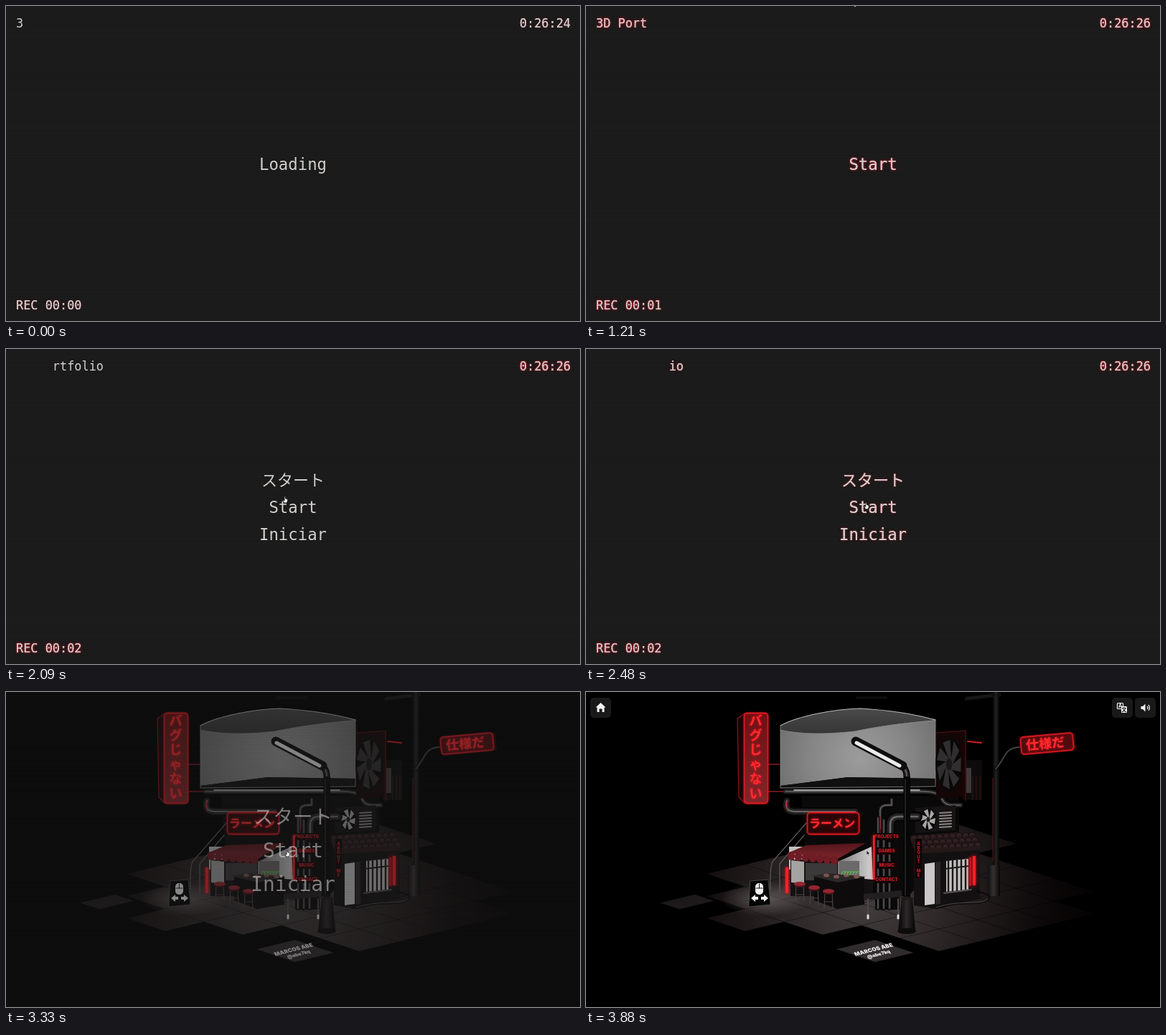
These frames come from a looping animation (800x440 px, 3910 ms). An HTML page with a canvas:

```html
<!DOCTYPE html>
<html lang="en">
<head>
<meta charset="utf-8">
<title>3D Portfolio</title>
<style>
html, body { margin: 0; width: 100%; height: 100%; overflow: hidden; background: #000; }
canvas { display: block; width: 800px; height: 440px; }
</style>
</head>
<body>
<canvas id="stage" width="800" height="440"></canvas>
<script>
const W = 800, H = 440, LOOP = 3910, CLICK = 2970, FADE = 660;
const MONO = '"DejaVu Sans Mono", monospace';
const CJK = '"Noto Sans CJK JP", "Noto Sans CJK", sans-serif';
const SANS = 'Inter, sans-serif';
const RED = '#f5202a';
const screen = document.getElementById('stage').getContext('2d');

const clamp = v => Math.max(0, Math.min(1, v));
const ramp = (t, from, span) => clamp((t - from) / span);
const ease = k => k * k * (3 - 2 * k);

function layer(draw) {
  const c = document.createElement('canvas');
  c.width = W; c.height = H;
  draw(c.getContext('2d'));
  return c;
}

function stops(g, colors) {
  colors.forEach((k, i) => g.addColorStop(i / (colors.length - 1), k));
  return g;
}

const scene = layer(c => {
  const repeat = (n, draw) => { for (let i = 0; i < n; i++) draw(i); };
  const across = (x, w, ...k) => stops(c.createLinearGradient(x, 0, x + w, 0), k);
  const down = (y, h, ...k) => stops(c.createLinearGradient(0, y, 0, y + h), k);
  const radial = (x, y, r, ...k) => stops(c.createRadialGradient(x, y, 0, x, y, r), k);
  const shape = (fill, d) => { c.fillStyle = fill; c.fill(new Path2D(d)); };
  const line = (color, w, d) => { c.strokeStyle = color; c.lineWidth = w; c.stroke(new Path2D(d)); };
  const rect = (fill, x, y, w, h) => { c.fillStyle = fill; c.fillRect(x, y, w, h); };
  // upright panel whose top and bottom edges slope by dy
  const wall = (fill, x, y, w, h, dy) => shape(fill, `M${x} ${y}l${w} ${dy}v${h}l${-w} ${-dy}Z`);
  const oval = (fill, x, y, rx, ry) => {
    c.beginPath(); c.ellipse(x, y, rx, ry, 0, 0, 7); c.fillStyle = fill; c.fill();
  };
  const pipe = (w, d) => {
    line('#050505', w, d); line('#242222', w * .65, d); line('#6b6868', w * .18, d);
  };
  const glow = (n, draw) => {
    c.save(); c.shadowColor = '#ff1018'; c.shadowBlur = n; draw(); c.restore();
  };
  const label = (s, x, y, font, color = RED) => {
    c.font = font; c.fillStyle = color; c.fillText(s, x, y);
  };
  const sign = (x, y, w, h, fill) => glow(2, () => {
    c.beginPath(); c.roundRect(x, y, w, h, 4);
    c.fillStyle = fill; c.fill();
    c.strokeStyle = '#d81c25'; c.lineWidth = 1.3; c.stroke();
  });
  const kana = (s, x, y, size) => glow(3, () => label(s, x, y, `900 ${size}px ${CJK}`, '#ff2b30'));
  const fan = (x, y, rx, ry, n, color) => {
    oval('#080808', x, y, rx, ry);
    c.save(); c.translate(x, y); c.scale(rx, ry);
    repeat(n, () => {
      c.rotate(2 * Math.PI / n);
      shape(color, 'M.12-.1L.35-.85 .75-.5 .2 .05Z');
    });
    c.restore();
    oval('#181818', x, y, rx * .22, ry * .22);
  };
  // paving grid: i runs right and away, j runs left and away
  const spot = (i, j) => `${492 + 54 * (i - j)} ${362 - 13 * i - 18 * j}`;
  const slab = (fill, i, j, a = 1, b = 1) => {
    const d = `M${spot(i, j)}L${spot(i + a, j)} ${spot(i + a, j + b)} ${spot(i, j + b)}Z`;
    shape(fill, d); line('rgba(0,0,0,.3)', .6, d);
  };

  c.lineCap = c.lineJoin = 'round';
  c.textAlign = 'center'; c.textBaseline = 'middle';
  rect('#000', 0, 0, W, H);

  // paving
  const floor = radial(390, 292, 320, '#423c3d', '#332d2e', '#211b1c', '#0e090a', '#030202');
  [0, 0, -1, -2, -1, 0].forEach((first, j) => {
    for (let i = first; i < 4 + j / 3; i++) slab(floor, i, j);
  });
  const pool = radial(0, 0, 1, 'rgba(150,142,142,.5)', 'rgba(150,142,142,0)');
  c.save(); c.translate(250, 289); c.scale(62, 24); oval(pool, 0, 0, 1, 1); c.restore();
  slab('#1d191a', -2, 4.7, .9, .5);
  slab('#302b2c', -1.45, .2);
  ['MARCOS ABE', '@abe7kq'].forEach((s, i) => {
    c.save();
    c.transform(.96, -.25, .5, .85, 401 + i * 7, 360 + i * 6.5);
    label(s, 0, 0, `900 ${8 - i}px ${SANS}`, '#eee');
    c.restore();
  });

  // far pole and rooftop machinery
  rect('#0d0b0c', 376, 6, 44, 4);
  wall('#171515', 528, 7, 50, 5, -6);
  rect(across(567, 9, '#080808', '#242122', '#050505'), 567, 0, 9, 284);
  line('#581a1f', 1, 'M567 120V235');
  rect(across(559, 18, '#0b0b0b', '#353132', '#060606'), 560, 242, 17, 43);
  pipe(4, 'M604 77C586 78 585 88 578 98L571 108');
  rect('#0d0b0b', 525, 95, 27, 56);
  rect('#3c393a', 529, 106, 8, 35);
  repeat(3, i => line('#37191b', 1, `M${539 + i * 5} 118v32`));
  line('#d31e28', 2, 'M532 69l19 2');

  // building body
  shape('#0a0909', 'M300 145H520V200L450 285H400L305 215Z');
  pipe(9, 'M278 139H470Q492 139 496 149T512 158H522');
  pipe(12, 'M280 152Q276 166 290 167H375');
  line('#b82129', 1.5, 'M279 154l2 12');
  line('#cfcfcf', 1.3, 'M290 137H465');
  pipe(7, 'M410 190V166Q410 158 420 158H426V150');

  // billboard
  wall('#080808', 270, 46, 219, 90, -8);
  shape(radial(382, 92, 140, '#9c9c9c', '#858585', '#686868'), 'M271 48L384 25 487 38V121L365 119 271 131Z');
  shape(down(23, 35, '#4a4a4a', '#363636'), 'M271 47C298 32 350 24 382 23Q440 26 487 39Q420 45 374 55Q310 62 271 53Z');
  line('#b9b9b9', 1.1, 'M271 47C298 32 350 24 382 23Q440 26 487 39');
  line('#8d8d8d', .7, 'M271 53Q310 62 374 55Q420 45 487 40');
  shape('#101010', 'M271 131L365 119 487 121V133L271 134Z');
  line('#8e8e8e', .8, 'M271 48V134L487 132V39');

  // rooftop fans
  wall('#140606', 488, 57, 42, 92, -3);
  line('#5e1116', 1, 'M488 57l41-3v98');
  fan(506, 101, 19, 38, 7, '#312e2f');
  wall('#151313', 459, 162, 56, 35, -4);
  fan(477, 178, 11, 16, 6, '#a8a5a5');
  repeat(6, i => line('#8b8686', 2, `M493 ${169 + i * 4}l16-1`));

  // neon signs
  const side = 'M221 30L211 37 213 147 221 155Z';
  shape('#170506', side); line('#94131a', 1.2, side);
  line('#67151a', 2, 'M253 101h17M253 139h22');
  sign(220.5, 29.5, 33, 126, down(30, 125, '#6d1013', '#80262a'));
  [...'バグじゃない'].forEach((s, i) => kana(s, 236.5, 40 + i * 20.3, 18));
  sign(308.5, 168.5, 72, 30, '#2a0508');
  kana('ラーメン', 343, 183, 16);
  c.save(); c.translate(643, 71.5); c.rotate(-.09);
  rect('#240507', -34, -11, 74, 25);
  sign(-37, -11.5, 73, 24, '#4f0b0f');
  kana('仕様だ', -3, 0, 18);
  c.restore();

  // ramen counter
  line('#5b5657', 1.3, 'M307 183L260 237Q256 246 257 276M304 200L270 240V280');
  rect('#c4c1c1', 283, 216, 21, 32);
  rect('#141112', 285, 234, 115, 51);
  wall('#a5a2a2', 286, 235, 18, 31, 2);
  rect('#3c393a', 306, 239, 44, 24);
  shape(across(350, 50, '#777', '#d4d2d2'), 'M351 237L398 216 400 262 351 258Z');
  rect('#6b6969', 353, 236, 28, 24);
  shape(down(212, 24, '#54161b', '#842830'), 'M307 214L390 211 351 233 281 225Z');
  repeat(7, i => oval('#701c24', 286 + i * 10, 229 + i, 5.2, 6));
  shape('#0d0b0c', 'M318 258H388V297L350 303 318 291Z');
  shape('#2b2728', 'M314 257L337 253 390 258 351 266Z');
  repeat(4, i => oval('#7c5449', 335 + i * 14, 256 + i % 2 * 2, 4, 2.5));
  repeat(6, i => line('#57b84e', 1.3, `M${356 + i * 4} 255q2-7 5-3`));
  repeat(3, i => {
    const x = 298 + i * 20, y = 268 + i * 5;
    line('#484244', 1.2, `M${x - 5} ${y}l-1 24M${x + 5} ${y}l1 24M${x - 6} ${y + 15}h12`);
    oval('#4a1217', x, y + 2, 8, 3);
    oval('#942630', x, y, 8, 3);
  });
  glow(4, () => { rect(RED, 278, 245, 4, 36); rect(RED, 400, 200, 2.5, 62); });

  // menu and pipes
  rect('#0b0909', 403, 192, 34, 112);
  repeat(3, i => pipe(6, `M${407 + i * 8} 302V${176 + i * 3}`));
  pipe(14, 'M424 203V186Q424 174 436 174H462');
  line('#b41a21', 1, 'M410 176v24');
  ['PROJECTS', 'GAMES', 'MUSIC', 'CONTACT'].forEach((s, i) => {
    rect('#140607', 404, 197 + i * 20, 31, 10);
    label(s, 419, 202.5 + i * 20, `800 6.3px ${SANS}`, '#d81d26');
  });

  // tiled house
  shape('#131011', 'M457 218L548 212 549 289 488 303 457 298Z');
  shape('#241819', 'M450 201L517 196 551 214 549 221 460 226Z');
  repeat(30, n => {
    const row = n % 3, i = Math.floor(n / 3);
    c.beginPath();
    c.ellipse(457 + row * 4 + i * 9, 205 + row * 7 - i * .5, 4.5, 5, 0, Math.PI, 0);
    c.fillStyle = '#322122'; c.fill();
    c.strokeStyle = '#120b0c'; c.lineWidth = 1; c.stroke();
  });
  rect('#110506', 459, 205, 9, 55);
  [...'ABOUT ME'].forEach((s, i) => label(s, 463.5, 212 + i * 6.3, `800 6px ${SANS}`, '#c21b23'));
  wall('#c9c7c7', 472, 240, 14, 58, -2);
  wall('#2a2627', 487, 238, 7, 59, -1);
  wall('#c2bfbf', 502, 236, 31, 43, -3);
  repeat(5, i => line('#1a1718', 2.4, `M${505 + i * 6} 235v44`));
  line('#1a1718', 2, 'M500 247l34-4');
  line('#555051', 2, 'M499 281l38-5');
  glow(5, () => { rect('#b9151d', 534, 231, 3, 40); rect(RED, 539, 229, 4, 41); });
  line('#0a0909', 2, 'M488 302C525 290 548 300 560 290S535 280 548 278');
  line('#6b6566', .7, 'M488 301C525 289 548 299 560 289');

  // barrier and sandwich board
  wall('#221f20', 387, 282, 53, 9, -5);
  for (const x of [393, 435]) {
    line('#4f494a', 2, `M${x} 289v25`);
    line('#e0dddd', 3, `M${x} 312v4`);
  }
  const board = 'M229 264L254 262 257 297 227 300Z';
  shape('#050505', board); line('#444', 1, board);
  c.beginPath(); c.roundRect(236, 267, 11, 16, 5); c.fillStyle = '#f1f1f1'; c.fill();
  line('#111', 1, 'M241.5 268v6M237 274h9');
  for (const s of [-1, 1]) shape('#f1f1f1', `M${242 + s * 12} 288l${-s * 6}-5v3h${-s * 4}v4h${s * 4}v3Z`);

  // street lamp
  pipe(9, 'M447 333V119Q448 107 437 101L376 68');
  line('#0d0d0d', 13, 'M376 69L441 103');
  line('#eceaea', 5, 'M377 71L437 103');
  rect('#070707', 443, 118, 9, 200);
  line('#3b3738', 1, 'M445 122V284');
  shape(across(435, 24, '#050505', '#2c2829', '#040404'), 'M440 287H455L459 334H435Z');
  oval('#0d0b0c', 447, 334, 13, 4);
  oval('#1e1a1b', 447, 288, 8, 2.5);
});

const icons = layer(c => {
  for (const x of [6, 733, 765]) {
    c.beginPath(); c.roundRect(x, 8, 29, 28, 5); c.fillStyle = '#191919'; c.fill();
  }
  c.fillStyle = c.strokeStyle = '#f4f4f4';
  c.fill(new Path2D('M20.5 15L27.5 21.5H25.5V28H22.5V23.5H18.5V28H15.5V21.5H13.5Z'));
  c.lineWidth = 1.2;
  c.beginPath(); c.roundRect(740.5, 15.5, 8, 8, 1); c.stroke();
  c.beginPath(); c.roundRect(746, 20, 8, 9, 1); c.fill();
  c.textAlign = 'center'; c.font = `700 7px ${SANS}`; c.fillText('A', 744.5, 22);
  c.fillStyle = '#191919'; c.font = `700 7px ${CJK}`; c.fillText('文', 750, 27.3);
  c.fillStyle = '#f4f4f4';
  c.fill(new Path2D('M773.5 20H776L779.5 16.5V27.5L776 24H773.5Z'));
  for (const r of [3, 5.5]) { c.beginPath(); c.arc(780, 22, r, -.8, .8); c.stroke(); }
});

const rows = layer(c => {
  for (let y = 0; y < H; y++) {
    const a = .15 + .1 * Math.sin(y * 2.72) + .05 * Math.sin(y * 2.1);
    c.fillStyle = `rgba(0,0,0,${a})`;
    c.fillRect(0, y, W, 1);
  }
});

function glowText(s, x, y, font, align, g) {
  const c = screen;
  c.font = font; c.textAlign = align;
  c.fillStyle = '#f8f4f2';
  if (g > .02) {
    c.shadowColor = `rgba(255,25,45,${g * .7})`;
    c.shadowBlur = 3;
    c.fillText(s, x, y);
  }
  c.fillText(s, x, y);
  c.shadowBlur = 0;
}

// types letter by letter, then wipes from the left
function title(t) {
  const full = '3D Portfolio', size = full.length;
  const n = Math.floor(1.5 + Math.min(t, 1210) / 190 + Math.max(0, t - 1210) / 88) % (2 * size);
  return n <= size ? full.slice(0, n) : ' '.repeat(n - size) + full.slice(n - size);
}

function menu(t, g) {
  const font = '22.3px ' + MONO;
  if (t < 1120) {
    const dots = Math.floor((t + 50) / 400);
    glowText('Loading' + '.'.repeat(dots), 400, 229, font, 'center', g);
    return;
  }
  glowText('Start', 400, 229, font, 'center', g);
  if (t < 1400) return;
  glowText('スタート', 400, 191, '22px ' + CJK, 'center', g);
  glowText('Iniciar', 400, 266.5, font, 'center', g);
}

function cursor(t) {
  const c = screen, hand = t > 1980 && t < 3500;
  const dive = ease(ramp(t, 1450, 600)), settle = ease(ramp(t, 2150, 600));
  const x = 366 + 6 * ramp(t, 480, 700) + 16 * dive + 3 * settle;
  const y = -10 + 14 * ramp(t, 400, 80) - 11 * ramp(t, 1130, 80) + 213 * dive + 15 * settle;
  const p = new Path2D(hand
    ? 'M0 0L1.2 0L1.7 3L4 3.5L4.5 6L3 9H0L-2 5.5L-1 5L.2 6Z'
    : 'M0 0V7L1.6 5.5L2.7 8L3.8 7.5L2.7 5H4.8Z');
  c.save(); c.translate(x, y);
  c.fillStyle = hand ? '#fff' : '#111';
  c.strokeStyle = hand ? '#222' : '#ddd';
  c.lineWidth = .8;
  c.fill(p); c.stroke(p);
  c.restore();
}

function draw(t) {
  const c = screen, p = ramp(t, CLICK, FADE), veil = 1 - p;
  c.globalAlpha = 1;
  c.drawImage(scene, 0, 0);
  if (veil > 0) {
    const wave = .5 - .5 * Math.cos(2 * Math.PI * t / 2090);
    const g = t < CLICK ? Math.sqrt(wave) : 0;
    c.globalAlpha = veil;
    c.fillStyle = '#202020';
    c.fillRect(0, 0, W, H);
    if (t < CLICK) {
      const font = '16.9px ' + MONO, steady = .3 + .7 * ramp(t, 0, 480);
      glowText(title(t), 14, 30, font, 'left', g);
      glowText(t < 1000 ? '0:26:24' : '0:26:26', 787, 30, font, 'right', steady);
      glowText('REC 00:0' + Math.floor(t / 1000), 14, 423.5, font, 'left', steady);
    }
    const s = 1 + .46 * p;
    c.save();
    c.globalAlpha = Math.sqrt(veil) * ramp(veil, 0, .6);
    c.translate(400, 220); c.scale(s, s); c.translate(-400, -220);
    menu(t, g);
    c.restore();
    c.drawImage(rows, 0, 0);
    c.globalAlpha = veil * (.01 + .01 * Math.sin(t / 24));
    c.fillStyle = '#000';
    c.fillRect(0, 0, W, H);
  }
  c.globalAlpha = ramp(t, 3500, 250);
  c.drawImage(icons, 0, 0);
  c.globalAlpha = 1;
  cursor(t);
}

const start = performance.now();
function tick() {
  draw((performance.now() - start) % LOOP);
  requestAnimationFrame(tick);
}
tick();
</script>
</body>
</html>
```
